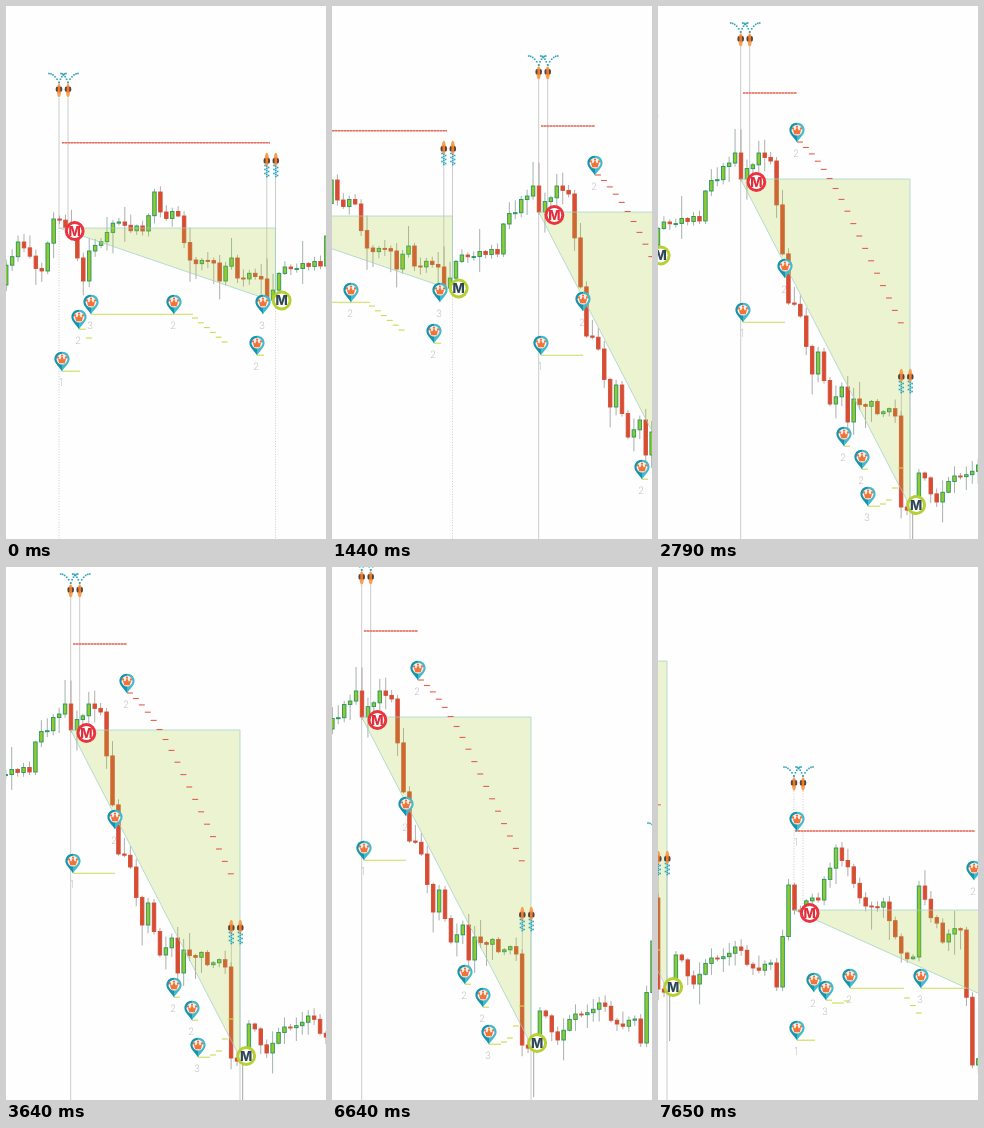
An HTML page for the animation above (8000 ms loop, 320 px wide and 533 px high).

```html
<!DOCTYPE html>
<html lang="en">
<head>
<meta charset="utf-8">
<title>Chart pan</title>
<style>
html, body { margin: 0; width: 100%; height: 100%; overflow: hidden; background: #fefefe; }
svg { display: block; width: 100vw; height: 100vh; }
.label { font: 200 10px Inter, Lato, sans-serif; fill: #b4b4b4; text-anchor: middle; }
.badge { font: 800 13px Inter, Roboto, sans-serif; text-anchor: middle; }
</style>
</head>
<body>
<svg id="stage" viewBox="0 0 320 533"><g id="world"></g></svg>
<script>
const NS = 'http://www.w3.org/2000/svg';
const world = document.getElementById('world');
const RED = '#e0604f', LIME = '#ccdb55', GREY = '#cccccc';
const SOLID = 'none', DOTS = '1 1.6';
const LOOP = 8000, SPACING = 5.93, FLOOR = 640;

function add(tag, attrs, parent = world) {
  const el = document.createElementNS(NS, tag);
  for (const key in attrs) el.setAttribute(key, attrs[key]);
  parent.appendChild(el);
  return el;
}

function line(x1, y1, x2, y2, stroke, width = 1, dash = SOLID) {
  add('line', { x1, y1, x2, y2, stroke, 'stroke-width': width, 'stroke-dasharray': dash });
}

function randomizer(seed) {
  return () => (seed = seed * 16807 % 2147483647) / 2147483647;
}

// Turning points of the price: candle index, height. Index 0 sits at x = 65.
const turns = [
  [-61, 224], [-58, 181], [-54, 210], [-52, 158], [-49, 176], [-47, 220], [-46, 190], [-41, 161],
  [-37, 170], [-35, 131], [-34, 151], [-31, 155], [-29, 199], [-25, 202], [-24, 220], [-22, 197],
  [-21, 217], [-17, 218], [-16, 239], [-13, 206], [-7, 205], [-6, 175], [-1, 137], [0, 163],
  [3, 137], [5, 145], [8, 287], [10, 300], [12, 358], [13, 336], [15, 388], [17, 371], [18, 406],
  [19, 383], [26, 400], [27, 491], [29, 487], [30, 457], [33, 486], [36, 460], [40, 449], [43, 470],
  [46, 465], [47, 489], [49, 387], [50, 412], [54, 402], [57, 350], [62, 408], [65, 404],
  [68, 455], [70, 459], [71, 388], [75, 444], [78, 432], [80, 567], [82, 549]
];

function candle(k, open, close, rand) {
  const x = 65 + k * SPACING, up = close < open;
  const top = Math.min(open, close), height = Math.max(1, Math.abs(open - close));
  const wick = () => 1 + 5 * rand() + 20 * rand() ** 5;
  line(x, top - wick(), x, top + height + wick(), up ? '#9aaaa3' : '#aaa3a1', 0.9);
  add('rect', {
    x: x - 1.75, y: top, width: 3.5, height,
    fill: up ? '#8fcb2c' : '#dc4a31', stroke: up ? '#259365' : '#cf5138', 'stroke-width': 0.9
  });
}

// Between two turns the price runs straight with a little noise.
function drawCandles() {
  const rand = randomizer(7);
  let open = turns[0][1];
  for (let i = 1; i < turns.length; i++) {
    const [k0, y0] = turns[i - 1], [k1, y1] = turns[i];
    for (let k = k0 + 1; k <= k1; k++) {
      const noise = k < k1 ? 11 * (rand() - 0.5) : 0;
      const close = y0 + (y1 - y0) * (k - k0) / (k1 - k0) + noise;
      candle(k, open, close, rand);
      open = close;
    }
  }
}

function zone(x1, y1, x2, y2) {
  add('path', {
    d: `M${x1} ${y1}H${x2}V${y2}Z`, fill: '#a8cc30', 'fill-opacity': 0.22,
    stroke: '#9fcfc8', 'stroke-opacity': 0.8, 'stroke-width': 0.9
  });
}

// Twin nozzles; dir -1 sprays upwards, 1 downwards. y is the middle of the body.
function nozzles(x, y, dir) {
  [-1, 1].forEach(side => {
    const cx = x + 4.5 + side * 4.5;
    add('ellipse', { cx, cy: y, rx: 2.1, ry: 6.8, fill: '#f6a050' });
    [-1, 1].forEach(s => add('ellipse', { cx: cx + s * 2, cy: y + dir * 1.2, rx: 1.3, ry: 2.8, fill: '#55443f' }));
    add('ellipse', { cx, cy: y + dir * 1.2, rx: 1.3, ry: 3.4, fill: '#ee7a2c' });
    const dot = (dx, dy) => add('rect', {
      x: cx + dx - 0.8, y: y + dir * dy - 0.8, width: 1.6, height: 1.6, fill: '#2fa3b8'
    });
    for (let i = 0; i < 6; i++) {
      const u = i / 5;
      if (dir < 0) {
        const rise = 8 + 9 * (1 - (1 - u) ** 2);
        dot(side * 10 * u, rise);
        dot(-side * 7 * u, rise);
      } else {
        dot(i % 2 ? 1.8 : -1.8, 6 + 2 * i);
        dot(0, 7 + 2 * i);
      }
    }
  });
}

function pin(x, y, label) {
  const g = add('g', { transform: `translate(${x} ${y})` });
  const half = s => `M0 -9.2C${s * 4.6} -9.2 ${s * 7.6} -6 ${s * 7.6} -2C${s * 7.6} 2.5 ${s * 2.5} 6 0 10.5Z`;
  add('path', { d: half(-1), fill: '#1594ad' }, g);
  add('path', { d: half(1), fill: '#43b9cc' }, g);
  add('circle', { cy: -1.8, r: 5.4, fill: '#fdeee6' }, g);
  add('path', { d: 'M-2.8 2.2L-4.2 -3L-1.8 -1.4L0 -5L1.8 -1.4L4.2 -3L2.8 2.2Z', fill: '#f0733c' }, g);
  [-4, 0, 4].forEach(cx => add('circle', { cx, cy: cx ? -3.6 : -5.4, r: 1.1, fill: '#f0733c' }, g));
  add('text', { x: -1, y: 25, class: 'label' }, g).textContent = label;
}

function badge(x, y, ring, ink) {
  add('circle', { cx: x, cy: y, r: 8.4, fill: '#fff', stroke: ring, 'stroke-width': 3 });
  add('text', { x, y: y + 4.7, class: 'badge', fill: ink }).textContent = 'M';
}

// A staircase of short dashes; height(i) gives each step.
function stairs(x, count, height, color = LIME) {
  for (let i = 0; i < count; i++) {
    const y = height(i);
    line(x + i * SPACING, y, x + (i + 1) * SPACING, y, color, 1.1);
  }
}

// Pins: x, y, label, length of the level that starts at the tip.
const trades = [
  {
    x: -238, y: 167, spray: 29.5, above: SOLID, below: DOTS,
    exit: { x: -21.5, y: 239.5, spray: 98.5 },
    stop: { x: -235, y: 81.7, length: 208 },
    pins: [[-235, 300, 1, 18], [-218, 258, 2, 7], [-206, 243, 3, 102], [-123, 243, 2, 0],
           [-34, 243, 3, 0], [-40, 284, 2, 7]]
  },
  {
    x: 64.7, y: 163, spray: 24, above: SOLID, below: SOLID,
    exit: { x: 234, y: 489, spray: 359.5 },
    stop: { x: 67, y: 77, length: 54 },
    pins: [[67, 296, 1, 42], [109, 252, 2, 0], [121, 116, 2, 0], [168, 420, 2, 6],
           [186, 443, 2, 6], [192, 480, 3, 12]]
  },
  {
    x: 361, y: 412, spray: 286, above: DOTS,
    exit: { x: 601, y: 519, spray: 440 },
    stop: { x: 362, y: 333, length: 180 },
    pins: [[364, 323, 1, 0], [364, 532, 1, 18], [381, 484, 2, 0], [393, 492, 3, 6],
           [417, 480, 2, 54], [488, 480, 3, 45], [541, 372, 2, 0]]
  }
];

function drawGuides({ x, y, spray, above, below, exit }) {
  line(x, spray + 7, x, y, GREY, 1, above);
  line(x + 9, spray + 7, x + 9, y, GREY, 1, above);
  line(exit.x - 8.7, exit.spray + 17, exit.x - 8.7, exit.y, GREY);
  line(exit.x, exit.spray + 17, exit.x, exit.y, GREY);
  if (!below) return;
  line(x, y, x, FLOOR, GREY, 1, below);
  line(exit.x, exit.y, exit.x, FLOOR, GREY, 1, below);
}

function drawLevels({ stop, pins }) {
  line(stop.x, stop.y, stop.x + stop.length, stop.y, '#ee9a90', 1.4);
  line(stop.x, stop.y, stop.x + stop.length, stop.y, RED, 1.1, '2 1');
  pins.forEach(([x, y, , length]) => length && line(x, y + 10.2, x + length, y + 10.2, LIME, 1.1));
}

function drawStairs() {
  let drop = 126;
  stairs(121, 18, i => i ? drop += Math.min(12.4, 4.6 + 0.9 * i) : drop, RED);
  stairs(-211, 1, () => 277);
  stairs(-105, 6, i => 257 + 4.8 * i);
  stairs(204, 4, i => 488 - 4 * i * i);
  stairs(399, 3, i => 505 - i * (i - 1));
  stairs(471, 3, i => 500 + 7.5 * i);
}

function drawMarks({ x, y, spray, exit, pins }) {
  nozzles(x, spray, -1);
  nozzles(exit.x - 8.7, exit.spray, 1);
  pins.forEach(([px, py, label]) => pin(px, py, label));
  badge(x + 15.7, y + 3, '#ea3440', '#e02f3a');
  badge(exit.x + 6.2, exit.y, '#b6cf33', '#2f4858');
}

trades.forEach(drawGuides);
line(236.7, 489, 236.7, 543, '#aaa3a1');
drawCandles();
trades.forEach(({ x, y, exit }) => zone(x, y, exit.x, exit.y + 1.5));
trades.forEach(drawLevels);
drawStairs();
trades.forEach(drawMarks);

// The view is dragged twice, in hard ticks along an eased path: tick, x, y, ease.
const linear = u => u, easeIn = u => u ** 1.5, easeOut = u => 1 - (1 - u) ** 2;
const drags = [
  { start: 500, tick: 134, path: [[-1, 291, 55], [7, 142, 43, easeIn], [12, 60, 32, linear], [23, 0, 0, easeOut]] },
  { start: 6330, tick: 140, path: [[-1, 0, 0], [0, -8, -4, linear], [5, -114, -38, easeIn], [9, -225, -69, linear]] }
];

function viewAt(t) {
  const { start, tick, path } = t < drags[1].start ? drags[0] : drags[1];
  const last = path[path.length - 1][0];
  const n = Math.min(last, Math.max(-1, Math.floor((t - start) / tick)));
  const i = Math.max(1, path.findIndex(key => key[0] >= n));
  const [n0, x0, y0] = path[i - 1], [n1, x1, y1, ease] = path[i];
  const u = ease((n - n0) / (n1 - n0));
  return [x0 + (x1 - x0) * u, y0 + (y1 - y0) * u].map(Math.round);
}

const begin = performance.now();
function render() {
  const [x, y] = viewAt((performance.now() - begin) % LOOP);
  world.setAttribute('transform', `translate(${x} ${y})`);
  requestAnimationFrame(render);
}
render();
</script>
</body>
</html>
```
